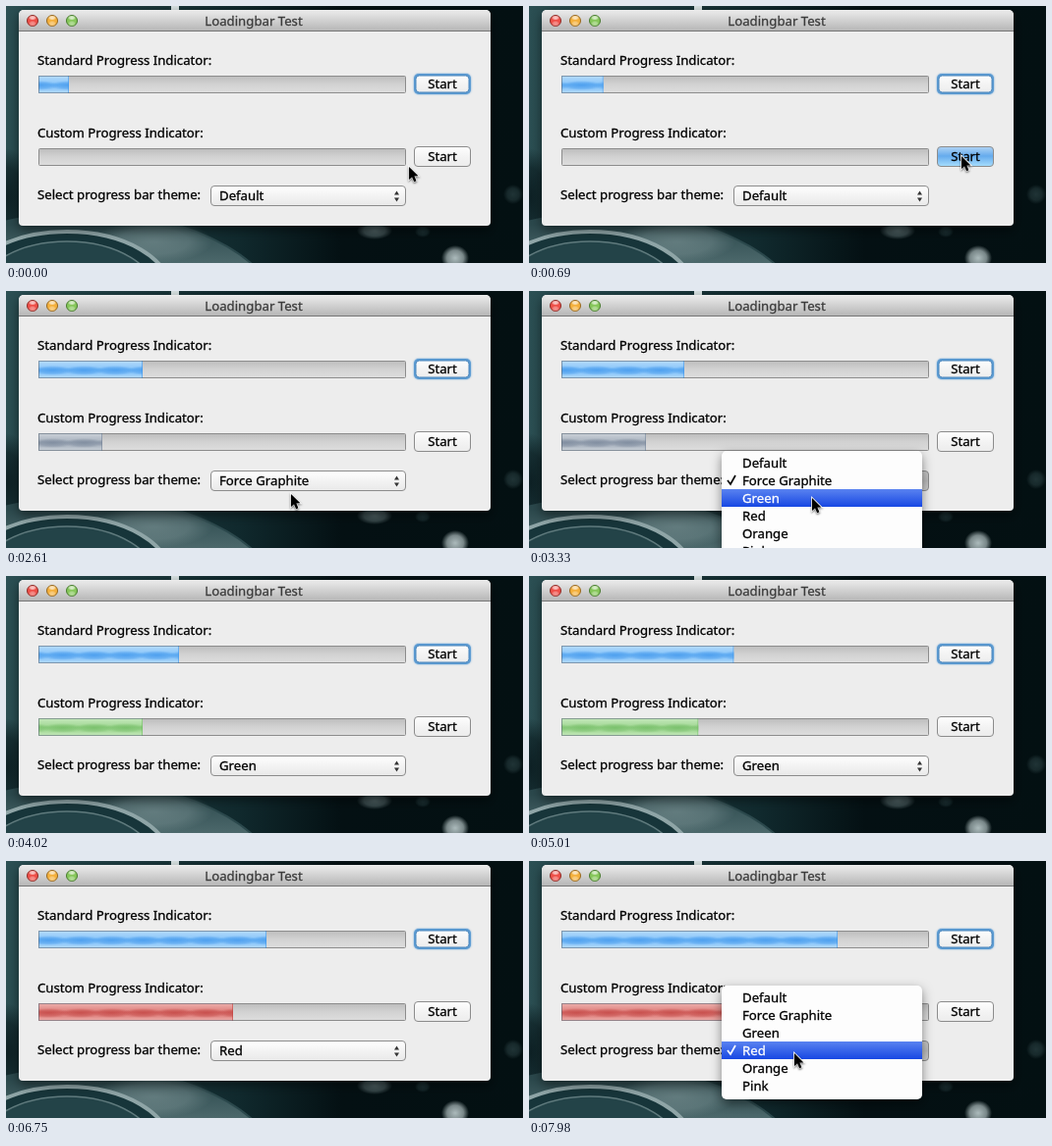
An HTML page with a canvas that plays this animation: 526 px wide and 262 px high, repeating every 8 s.

```html
<!DOCTYPE html>
<html lang="en">
<head>
<meta charset="utf-8">
<title>Loadingbar Test</title>
<style>
  html, body { margin: 0; width: 100%; height: 100%; overflow: hidden; background: #061719; }
  canvas { display: block; }
</style>
</head>
<body>
<canvas width="526" height="262"></canvas>
<script>
const LOOP = 8000;
const ctx = document.querySelector('canvas').getContext('2d');

const themes = [
  { name: 'Default', base: '#86c4f9', shade: '62,150,236' },
  { name: 'Force Graphite', base: '#a9b3bf', shade: '118,132,152' },
  { name: 'Green', base: '#a0d892', shade: '112,187,98' },
  { name: 'Red', base: '#df7d79', shade: '194,66,64' },
  { name: 'Orange' },
  { name: 'Pink' }
];

// [time, value...] keys, interpolated linearly
const standardKeys = [[0, 31], [1350, 54], [2610, 106], [4020, 143], [5820, 202], [6750, 232], [7980, 281], [8000, 282]];
const customKeys = [[750, 0], [1350, 21], [2610, 65], [4020, 106], [6750, 198], [8000, 240]];
const cursorKeys = [
  [0, 410, 164], [450, 440, 153], [800, 440, 153], [1150, 290, 193], [1350, 293, 236],
  [1700, 292, 228], [2150, 290, 207], [2610, 290, 207], [2780, 288, 194],
  [3000, 288, 194], [3300, 288, 211], [3480, 288, 211], [3850, 300, 285], [4950, 290, 285],
  [5300, 266, 194], [5480, 266, 194], [5750, 267, 215], [6180, 267, 215], [6550, 285, 285],
  [7150, 285, 285], [7450, 270, 196], [8000, 270, 196]
];
const menuSessions = [
  { press: 1150, open: 1400, close: 2580, checked: 0 },
  { press: 2800, open: 2850, close: 3450, checked: 1 },
  { press: 5300, open: 5350, close: 6150, checked: 2 },
  { press: 7450, open: 7500, close: LOOP, checked: 3 }
];

function sample(keys, t) {
  if (t <= keys[0][0]) return keys[0].slice(1);
  const i = keys.findIndex(k => k[0] > t);
  if (i < 0) return keys[keys.length - 1].slice(1);
  const a = keys[i - 1], b = keys[i];
  const p = (t - a[0]) / (b[0] - a[0]);
  return a.slice(1).map((v, n) => v + (b[n + 1] - v) * p);
}

function vertical(y, h, ...colors) {
  const g = ctx.createLinearGradient(0, y, 0, y + h);
  colors.forEach((c, i) => g.addColorStop(i / (colors.length - 1), c));
  return g;
}

function rounded(x, y, w, h, radius, fill, stroke) {
  ctx.beginPath();
  ctx.roundRect(x, y, w, h, radius);
  if (fill) { ctx.fillStyle = fill; ctx.fill(); }
  if (stroke) { ctx.strokeStyle = stroke; ctx.lineWidth = 1; ctx.stroke(); }
}

function shadow(color, blur, dy = 0) {
  ctx.shadowColor = color;
  ctx.shadowBlur = blur;
  ctx.shadowOffsetY = dy;
}

// A hairline stroke gives the text its slightly heavy look.
function text(s, x, y, color = '#000', align = 'left') {
  ctx.font = '13.2px "Noto Sans", "Open Sans", sans-serif';
  ctx.textAlign = align;
  ctx.fillStyle = ctx.strokeStyle = color;
  ctx.lineWidth = .3;
  ctx.fillText(s, x, y);
  ctx.strokeText(s, x, y);
}

function glow(x, y, rx, ry, rgb, alpha) {
  ctx.save();
  ctx.translate(x, y);
  ctx.scale(rx, ry);
  const g = ctx.createRadialGradient(0, 0, 0, 0, 0, 1);
  g.addColorStop(0, `rgba(${rgb},${alpha})`);
  g.addColorStop(.6, `rgba(${rgb},${alpha * .7})`);
  g.addColorStop(1, `rgba(${rgb},0)`);
  ctx.fillStyle = g;
  ctx.fillRect(-1, -1, 2, 2);
  ctx.restore();
}

function disc(x, y, rx, ry, fill, rim, width) {
  ctx.beginPath();
  ctx.ellipse(x, y, rx, ry, 0, 0, Math.PI * 2);
  ctx.fillStyle = fill;
  ctx.fill();
  ctx.strokeStyle = rim;
  ctx.lineWidth = width;
  ctx.stroke();
}

function drawDesktop() {
  const g = ctx.createLinearGradient(0, 0, 526, 0);
  g.addColorStop(0, '#2b4f53');
  g.addColorStop(.45, '#10292d');
  g.addColorStop(.65, '#041013');
  g.addColorStop(1, '#031012');
  ctx.fillStyle = g;
  ctx.fillRect(0, 0, 526, 262);
  glow(0, 195, 30, 50, '5,20,24', .8);
  ctx.fillStyle = '#dbe5e5';
  ctx.fillRect(168, 0, 8, 4);
  disc(80, 330, 205, 120, vertical(222, 40, '#2b484c', '#4c686b'), '#2b484c', 2);
  glow(150, 240, 60, 22, '125,148,150', .6);
  disc(62, 292, 106, 62, '#17353a', '#8fa5a7', 4);
  disc(62, 296, 92, 56, '#234348', '#5f7a7d', 1.5);
  glow(375, 229, 18, 9, '105,125,127', .7);
  glow(457, 257, 14, 13, '190,205,206', .9);
  glow(424, 230, 8, 6, '60,90,94', .4);
  glow(516, 192, 10, 10, '75,105,108', .4);
}

function drawWindow() {
  ctx.save();
  shadow('rgba(0,0,0,.5)', 12, 4);
  rounded(13, 4, 480, 220, [5, 5, 4, 4], '#ededed');
  ctx.restore();
  rounded(13, 4, 480, 22, [5, 5, 0, 0], vertical(4, 22, '#ececec', '#d0d0d0', '#b4b4b4'));
  ctx.fillStyle = '#777';
  ctx.fillRect(13, 25, 480, 1);
  [['#ee4f48', '#8c2b25'], ['#f4b03c', '#94661f'], ['#86c75a', '#477a2e']].forEach(([fill, rim], i) => {
    const x = 27 + i * 20;
    rounded(x - 5.5, 9.5, 11, 11, 5.5, fill, rim);
    glow(x, 12, 4, 2.5, '255,255,255', .75);
    glow(x, 18, 4, 3, '255,255,255', .4);
  });
  text('Loadingbar Test', 252, 20, '#3c3c3c', 'center');
  text('Standard Progress Indicator:', 32, 60);
  text('Custom Progress Indicator:', 32, 134);
  text('Select progress bar theme:', 32, 197);
}

function drawProgress(y, width, theme, t) {
  const x = 33, h = 18;
  rounded(x + .5, y + .5, 373, h - 1, 1, vertical(y, h, '#bcbcbc', '#d2d2d2', '#dedede'), '#8c8c8c');
  if (width < 1) return;
  ctx.save();
  ctx.beginPath();
  ctx.rect(x, y, width, h);
  ctx.clip();
  ctx.fillStyle = theme.base;
  ctx.fillRect(x, y, width, h);
  const period = 32;
  for (let bx = x - period + t * .03 % period; bx < x + width + period; bx += period) {
    glow(bx, y + 10, 21, 5, theme.shade, .8);
  }
  ctx.fillStyle = vertical(y, h, 'rgba(255,255,255,.4)', 'rgba(255,255,255,.2)', 'rgba(255,255,255,0)', 'rgba(255,255,255,.1)', 'rgba(255,255,255,.4)');
  ctx.fillRect(x, y, width, h);
  ctx.fillStyle = `rgba(${theme.shade},.6)`;
  ctx.fillRect(x + width - 1, y, 1, h);
  ctx.strokeStyle = 'rgba(80,95,110,.55)';
  ctx.lineWidth = 1;
  ctx.strokeRect(x + .5, y + .5, 373, h - 1);
  ctx.restore();
}

function drawButton(y, focused, pressed) {
  if (focused) {
    ctx.save();
    shadow('#5f9fd6', 2);
    rounded(415, y, 58, 21, 5, '#5c9bd2');
    ctx.restore();
  }
  const fill = pressed ? vertical(y, 20, '#b5d6f5', '#65abed', '#a5dcfc') : vertical(y, 20, '#fff', '#f4f4f4', '#ececec');
  const inset = focused ? 2 : .5;
  rounded(415 + inset, y + inset, 58 - 2 * inset, 21 - 2 * inset, 3.5, fill, focused ? '#4a86bd' : '#8c8c8c');
  text('Start', 444, y + 15, '#000', 'center');
}

function triangle(x, y, dy) {
  ctx.beginPath();
  ctx.moveTo(x - 2.5, y);
  ctx.lineTo(x + 2.5, y);
  ctx.lineTo(x, y + dy);
  ctx.fillStyle = '#333';
  ctx.fill();
}

function drawPopup(label, pressed) {
  const colors = pressed ? ['#c9c9c9', '#bababa', '#cfcfcf'] : ['#fff', '#f3f3f3', '#e9e9e9'];
  rounded(208.5, 183.5, 198, 20, 3.5, vertical(183, 21, ...colors), '#8c8c8c');
  text(label, 217, 198);
  triangle(397.5, 192.5, -4);
  triangle(397.5, 195.5, 4);
}

function drawMenu(checked, cursorY) {
  const top = 181 - checked * 18;
  ctx.save();
  shadow('rgba(0,0,0,.45)', 11, 4);
  rounded(196, top, 204, 116, 5, '#fdfdfd');
  ctx.restore();
  themes.forEach(({ name }, i) => {
    const y = top + 3 + i * 18;
    const hot = cursorY >= y && cursorY < y + 18;
    if (hot) {
      ctx.fillStyle = vertical(y, 18, '#5a83f0', '#1747e3');
      ctx.fillRect(196, y, 204, 18);
    }
    const color = hot ? '#fff' : '#000';
    text(name, 217, y + 14, color);
    if (i === checked) {
      ctx.beginPath();
      ctx.moveTo(202, y + 9);
      ctx.lineTo(205, y + 13);
      ctx.lineTo(210, y + 4);
      ctx.strokeStyle = color;
      ctx.lineWidth = 1.7;
      ctx.stroke();
    }
  });
}

function drawCursor(x, y) {
  ctx.save();
  ctx.translate(x, y);
  ctx.scale(.87, .87);
  shadow('rgba(0,0,0,.4)', 2, 1);
  const shape = new Path2D('M0 0V15L3.5 11.8L6 17.5L8.5 16.4L6.1 10.8H10.8Z');
  ctx.strokeStyle = '#fff';
  ctx.lineWidth = 2;
  ctx.stroke(shape);
  ctx.fillStyle = '#000';
  ctx.fill(shape);
  ctx.restore();
}

function render(now) {
  const t = now % LOOP;
  const [x, y] = sample(cursorKeys, t);
  const selected = menuSessions.filter(m => t >= m.close).length;
  const session = menuSessions.find(m => t >= m.press && t < m.close);
  drawDesktop();
  drawWindow();
  drawProgress(71, sample(standardKeys, t)[0], themes[0], t);
  drawProgress(145, sample(customKeys, t)[0], themes[selected], t);
  drawButton(69, true, false);
  drawButton(143, false, t >= 650 && t < 750);
  drawPopup(themes[selected].name, Boolean(session));
  if (session && t >= session.open) drawMenu(session.checked, y);
  drawCursor(x, y);
}

const start = performance.now();
function tick() {
  render(performance.now() - start);
  requestAnimationFrame(tick);
}
tick();
</script>
</body>
</html>
```
